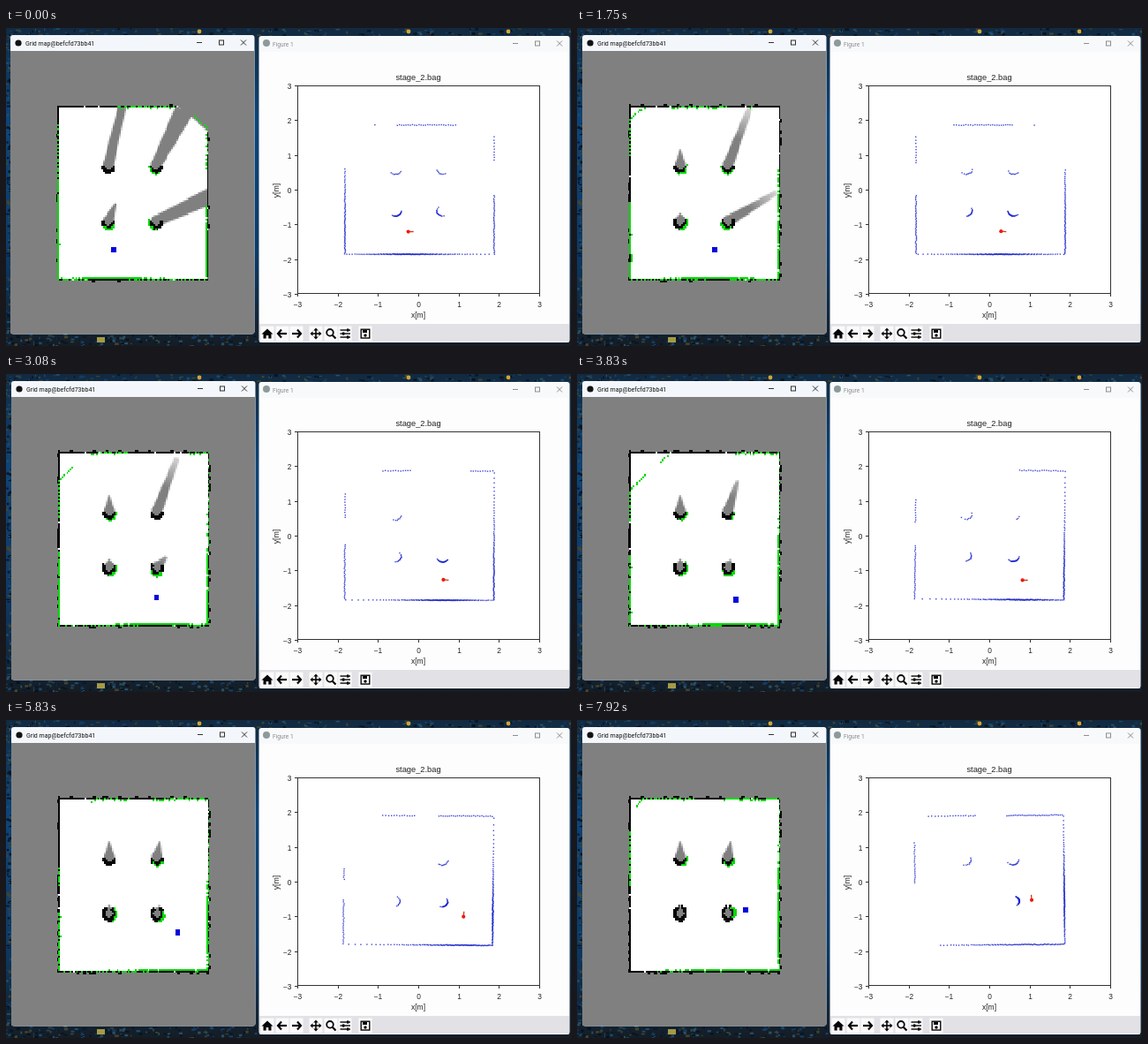
Write an HTML page with a canvas that moves like this. It is 640x360 px and loops after 8 s.

```html
<!DOCTYPE html>
<html lang="en">
<head>
<meta charset="utf-8">
<title>Grid mapping</title>
<style>
  html, body { margin: 0; width: 100%; height: 100%; overflow: hidden; background: #0c2238; }
  canvas { display: block; width: 100%; height: 100%; }
</style>
</head>
<body>
<canvas id="stage" width="640" height="360"></canvas>
<script>
const ctx = document.getElementById('stage').getContext('2d');
const LOOP = 8000, STEP = 1000 / 12;
const UNKNOWN = '#808080', GREEN = '#0ad80a', INK = '#060606';
const SANS = '"Liberation Sans", Arial, sans-serif';
const UI = 'Roboto, "Open Sans", sans-serif';

// Waypoints of the drive: time in ms, x and y in metres.
const PATH = [
  [0, -.27, -1.21], [1750, .27, -1.2], [3080, .6, -1.27], [4670, 1, -1.25],
  [5830, 1.1, -1.01], [6830, 1.05, -.78], [7920, 1.03, -.53]
];
const WALL = { l: -1.84, r: 1.86, b: -1.86, t: 1.86 };
const PILLARS = [[-.59, .59], [.59, .59], [-.59, -.61], [.59, -.61]];
const PILLAR_R = .15, RANGE = 3.5;

const lerp = (a, b, u) => a + (b - a) * u;
const clamp = u => Math.max(0, Math.min(1, u));
function smooth(from, to, t) {
  const u = clamp((t - from) / (to - from));
  return u * u * (3 - 2 * u);
}

function hash(a, b = 0) {
  const s = Math.sin(a * 127.1 + b * 311.7) * 43758.5453;
  return s - Math.floor(s);
}

// Smooth curve through the waypoints.
function position(t) {
  const last = PATH.length - 1;
  let i = 0;
  while (i < last - 1 && t >= PATH[i + 1][0]) i++;
  const a = PATH[i], b = PATH[i + 1], span = b[0] - a[0], u = (t - a[0]) / span;
  const slope = (n, c) => {
    const p = PATH[Math.max(0, n - 1)], q = PATH[Math.min(last, n + 1)];
    return (q[c] - p[c]) / (q[0] - p[0]) * span;
  };
  return [1, 2].map(c => lerp(a[c], b[c], u * u * (3 - 2 * u))
    + slope(i, c) * u * (1 - u) ** 2 - slope(i + 1, c) * u * u * (1 - u));
}

function poseAt(t) {
  const [x, y] = position(t), [x0, y0] = position(t - 40), [x1, y1] = position(t + 40);
  return { x, y, heading: Math.atan2(y1 - y0, x1 - x0) };
}

function castRay(x, y, angle) {
  const dx = Math.cos(angle), dy = Math.sin(angle);
  let d = Math.min(((dx > 0 ? WALL.r : WALL.l) - x) / dx, ((dy > 0 ? WALL.t : WALL.b) - y) / dy);
  for (const [px, py] of PILLARS) {
    const along = (px - x) * dx + (py - y) * dy;
    const side = (px - x) * dy - (py - y) * dx;
    const h = PILLAR_R ** 2 - side ** 2;
    if (along > 0 && h > 0) d = Math.min(d, along - Math.sqrt(h));
  }
  return d;
}

function scan({ x, y, heading }, seed, bias = 0) {
  const hits = [];
  for (let n = 0; n < 360; n++) {
    const a = heading + n * Math.PI / 180 + 1e-4;
    const d = castRay(x, y, a);
    const r = Math.min(d, RANGE) + bias + (hash(n, seed) - .5) * .024;
    hits.push({ x: x + r * Math.cos(a), y: y + r * Math.sin(a), far: d > RANGE });
  }
  return hits;
}

function box(x, y, w, h, color) {
  ctx.fillStyle = color;
  ctx.fillRect(x, y, w, h);
}

function disc(x, y, r, color) {
  ctx.fillStyle = color;
  ctx.beginPath();
  ctx.arc(x, y, r, 0, 7);
  ctx.fill();
}

function line(points, color, width = 1) {
  ctx.strokeStyle = color;
  ctx.lineWidth = width;
  ctx.beginPath();
  points.forEach(([x, y]) => ctx.lineTo(x, y));
  ctx.stroke();
}

function poly(c, points, color) {
  c.fillStyle = color;
  c.beginPath();
  points.forEach(([x, y]) => c.lineTo(x, y));
  c.fill();
}

function text(s, x, y, size, align = 'left', color = '#222', family = SANS) {
  ctx.font = `${size}px ${family}`;
  ctx.textAlign = align;
  ctx.fillStyle = color;
  ctx.fillText(s, x, y);
}

function panel(x, y, w, h, color) {
  ctx.fillStyle = color;
  ctx.beginPath();
  ctx.roundRect(x, y, w, h, 3);
  ctx.fill();
}

function windowButtons(x, y, color) {
  line([[x - 3, y], [x + 3, y]], color);
  ctx.strokeRect(x + 22.5, y - 2.5, 5, 5);
  line([[x + 47, y - 3], [x + 53, y + 3]], color);
  line([[x + 53, y - 3], [x + 47, y + 3]], color);
}

function drawWallpaper() {
  const g = ctx.createLinearGradient(0, 0, 0, 360);
  g.addColorStop(0, '#122a40');
  g.addColorStop(.3, '#0d4478');
  g.addColorStop(.7, '#0d3a66');
  g.addColorStop(1, '#141d26');
  ctx.fillStyle = g;
  ctx.fillRect(0, 0, 640, 360);
  const tints = ['#1c4a6a', '#143c64', '#2c5060', '#08121e', '#0a1622', '#44442e'];
  const speck = (x, y, n) => box(x, y, 1 + hash(n, 3) * 4, 1 + hash(n, 4) * 2, tints[Math.floor(hash(n, 5) * 6)]);
  for (let n = 0; n < 150; n++) {
    speck(hash(n, 1) * 640, hash(n, 2) * 9, n);
    speck(hash(n, 6) * 290, 346 + hash(n, 7) * 14, n + 200);
    speck(hash(n, 8) * 5, hash(n, 9) * 360, n + 400);
  }
  for (const x of [219, 456, 569]) disc(x, 4, 2.4, '#d2a632');
  box(103, 350, 9, 6, '#a59a45');
}

// Occupancy grid, one pixel per 4 cm cell, shown at 276 x 320.
const SIZE = 150, CELL_W = 276 / SIZE, CELL_H = 320 / SIZE;
const grid = document.createElement('canvas');
grid.width = grid.height = SIZE;
const gc = grid.getContext('2d');
const col = x => 75 + x * 25;
const row = y => 75.3 - y * 24.8;
const mapX = x => 6 + col(x) * CELL_W;
const mapY = y => 26 + row(y) * CELL_H;
const FIRST = 29, LAST = 121;

function cell(i, j, color, size = 1) {
  gc.fillStyle = color;
  gc.fillRect(Math.floor(i), Math.floor(j), size, size);
}

// Left tip and width of each unseen wedge, and when it gets cleared.
const WEDGES = [
  { tip: [128, 89], width: 9, from: 0, to: 1700 },
  { tip: [193, 89], width: 22, from: 2700, to: 4600 },
  { tip: [124, 198], width: 2, from: 0, to: 1700 },
  { tip: [230, 181], width: 19, from: 1300, to: 3600 }
];

function drawWedge({ tip, width, from, to }, [px, py], t) {
  const x = mapX(px), y = mapY(py), cleared = smooth(from, to, t), narrowed = clamp(t / 1500);
  const tx = lerp(tip[0], x + (px < 0 ? -1 : 2), cleared);
  const ty = lerp(tip[1], y - (py > 0 ? 18 : 9), cleared);
  const len = Math.hypot(tx - x, ty - y);
  const nx = (y - ty) / len, ny = (tx - x) / len;
  const w = lerp(lerp(width, 6, narrowed), 2, cleared);
  const g = gc.createLinearGradient(x, y, tx, ty);
  g.addColorStop(0, UNKNOWN);
  g.addColorStop(.45, UNKNOWN);
  g.addColorStop(1, `rgba(128,128,128,${lerp(lerp(1, .3, narrowed), .8, cleared)})`);
  poly(gc, [[x - nx * 6, y - ny * 6], [tx, ty], [tx + nx * w, ty + ny * w], [x + nx * 6, y + ny * 6]], g);
  gc.fillStyle = UNKNOWN;
  gc.beginPath();
  gc.ellipse(x, y, 6, 7, 0, 0, 7);
  gc.fill();
}

function drawWalls(t, corner) {
  const ragged = .1 + .2 * clamp(t / 3500);
  const walls = [
    (n, out) => [FIRST - out, n], (n, out) => [LAST + out, n],
    (n, out) => [n, FIRST - out], (n, out) => [n, LAST + out]
  ];
  walls.forEach((place, w) => {
    for (let n = FIRST; n <= LAST; n++) {
      const unseen = w === 1 ? n < FIRST + 14 * corner : w === 2 && n > LAST - 20 * corner;
      if (unseen) continue;
      if (hash(n, w) < .95) cell(...place(n, 0), INK);
      if (hash(n >> 1, w + 10) < ragged) cell(...place(n, 1), INK);
    }
  });
}

function drawRims(t) {
  PILLARS.forEach(([x, y]) => {
    const reach = y > 0 ? 1.4 : lerp(1.5, 2.9, t / LOOP);
    for (let a = -reach; a <= reach; a += .08) {
      for (const r of [.12, PILLAR_R]) cell(col(x + r * Math.sin(a)), row(y - r * Math.cos(a)), INK);
    }
  });
}

function updateGrid(t, k, pose) {
  const corner = clamp(1 - t / 1400);
  gc.resetTransform();
  gc.fillStyle = UNKNOWN;
  gc.fillRect(0, 0, SIZE, SIZE);
  cell(FIRST, FIRST, '#fff', LAST - FIRST + 1);
  gc.setTransform(1 / CELL_W, 0, 0, 1 / CELL_H, -6 / CELL_W, -26 / CELL_H);
  poly(gc, [[231 - 37 * corner, 88], [231 - 19 * corner, 88 + 13 * corner], [231, 88 + 31 * corner], [231, 88]], UNKNOWN);
  WEDGES.forEach((wedge, i) => drawWedge(wedge, PILLARS[i], t));
  gc.resetTransform();
  drawWalls(t, corner);
  drawRims(t);
  for (const h of scan(pose, k, -.03)) cell(col(h.x), row(h.y), GREEN);
  cell(col(pose.x) - 1, row(pose.y) - 1, '#0606dc', 3);
}

function drawMapWindow(t, k, pose) {
  const lag = lerp(.19, .02, clamp(t / 1750));
  ctx.save();
  ctx.translate(t < 800 ? -1 : 0, 0);
  panel(6, 8, 276.5, 338.5, '#f3f6fa');
  disc(15, 17, 3.6, '#111');
  text('Grid map@befcfd73bb41', 23, 19.5, 7, 'left', '#111', UI);
  windowButtons(220, 16.5, '#333');
  updateGrid(t, k, { ...pose, x: pose.x - lag });
  ctx.imageSmoothingEnabled = false;
  ctx.drawImage(grid, 6, 26, 276, 320);
  ctx.restore();
}

const plotX = x => 468 + x * 45.67;
const plotY = y => 183 - y * 39.33;

function drawAxes() {
  ctx.strokeStyle = '#333';
  ctx.lineWidth = 1;
  ctx.strokeRect(330.5, 65.5, 274, 235);
  for (let v = -3; v <= 3; v++) {
    const label = String(v).replace('-', '\u2212');
    const px = Math.round(plotX(v)) - .5, py = Math.round(plotY(v)) + .5;
    line([[px, 301], [px, 304]], '#333');
    line([[327, py], [330, py]], '#333');
    text(label, px, 316, 8.4, 'center');
    text(label, 323.5, py + 3, 8.4, 'right');
  }
  text('stage_2.bag', 467, 59, 9.3, 'center');
  text('x[m]', 467, 328, 8.5, 'center');
  ctx.save();
  ctx.translate(309, 184);
  ctx.rotate(-Math.PI / 2);
  text('y[m]', 0, 0, 8.8, 'center');
  ctx.restore();
}

function arrow(x, y, dir) {
  line([[x - 5 * dir, y], [x + 4 * dir, y]], INK, 2.2);
  line([[x + dir, y - 4.5], [x + 5 * dir, y], [x + dir, y + 4.5]], INK, 2.2);
}

function drawToolbar() {
  const y = 346;
  box(287, 335, 351, 20.5, '#e2e2e6');
  for (const x of [296, 313, 329, 351, 368, 384, 407]) box(x - 7.5, 337.5, 15, 17, '#fafafa');
  poly(ctx, [[289.5, y + .5], [296, y - 5.5], [302.5, y + .5]], INK);
  box(291.5, y, 3.2, 5.5, INK);
  box(297.3, y, 3.2, 5.5, INK);
  box(292, y, 8, 2, INK);
  arrow(313, y, -1);
  arrow(329, y, 1);
  for (let q = 0; q < 4; q++) {
    ctx.save();
    ctx.translate(351, y);
    ctx.rotate(q * Math.PI / 2);
    line([[0, 0], [4, 0]], INK, 1.6);
    poly(ctx, [[3.5, -2.8], [6.5, 0], [3.5, 2.8]], INK);
    ctx.restore();
  }
  ctx.lineWidth = 1.8;
  ctx.beginPath();
  ctx.arc(367, y - 1.2, 3.8, 0, 7);
  ctx.stroke();
  line([[369.8, y + 1.8], [373.5, y + 5.5]], INK, 2.2);
  for (let n = -1; n <= 1; n++) {
    line([[378.5, y + 4 * n], [390, y + 4 * n]], INK, 1.4);
    box(n ? 386 : 381, y + 4 * n - 1.6, 2.4, 3.2, INK);
  }
  ctx.strokeStyle = INK;
  ctx.lineWidth = 1.4;
  ctx.strokeRect(402.2, y - 4.8, 9.6, 9.8);
  box(404, y - 4, 5, 3, INK);
  disc(407, y + 2, 1.7, INK);
}

function drawPlotWindow(t, k, pose) {
  panel(286.5, 9, 352, 347, '#fdfdfd');
  box(287, 10, 351, 17, '#f8f9fb');
  disc(295, 17, 4, '#8d9a9c');
  text('Figure 1', 302, 20.5, 6.6, 'left', '#8a8a8a', UI);
  windowButtons(577, 17.5, '#8f8f8f');
  box(331, 66, 273, 234, '#fff');
  // Odometry error: a slow offset and a wobble while turning.
  const drift = smooth(2700, 4700, t);
  const tilt = t > 2700 ? .013 * Math.sin((t - 2700) / 4130 * Math.PI) : 0;
  for (const h of scan(pose, k)) {
    if (h.far) continue;
    const x = h.x + h.y * tilt - .025 * drift, y = h.y - h.x * tilt + .04 * drift;
    box(plotX(x) - .7, plotY(y) - .7, 1.4, 1.4, 'rgba(30,40,205,.85)');
  }
  const px = plotX(pose.x), py = plotY(pose.y);
  line([[px, py], [px + 6 * Math.cos(pose.heading), py - 6 * Math.sin(pose.heading)]], '#d03c1c', 1.3);
  disc(px, py, 2.1, '#ee1a0c');
  drawAxes();
  drawToolbar();
}

function draw(k) {
  const t = k * STEP, pose = poseAt(t);
  drawWallpaper();
  drawMapWindow(t, k, pose);
  drawPlotWindow(t, k, pose);
}

const start = performance.now();
let shown = -1;
function tick() {
  const t = (performance.now() - start) % LOOP;
  const k = Math.floor((t + 5) / STEP) % 96;
  if (k !== shown) draw(shown = k);
  requestAnimationFrame(tick);
}
tick();
</script>
</body>
</html>
```
